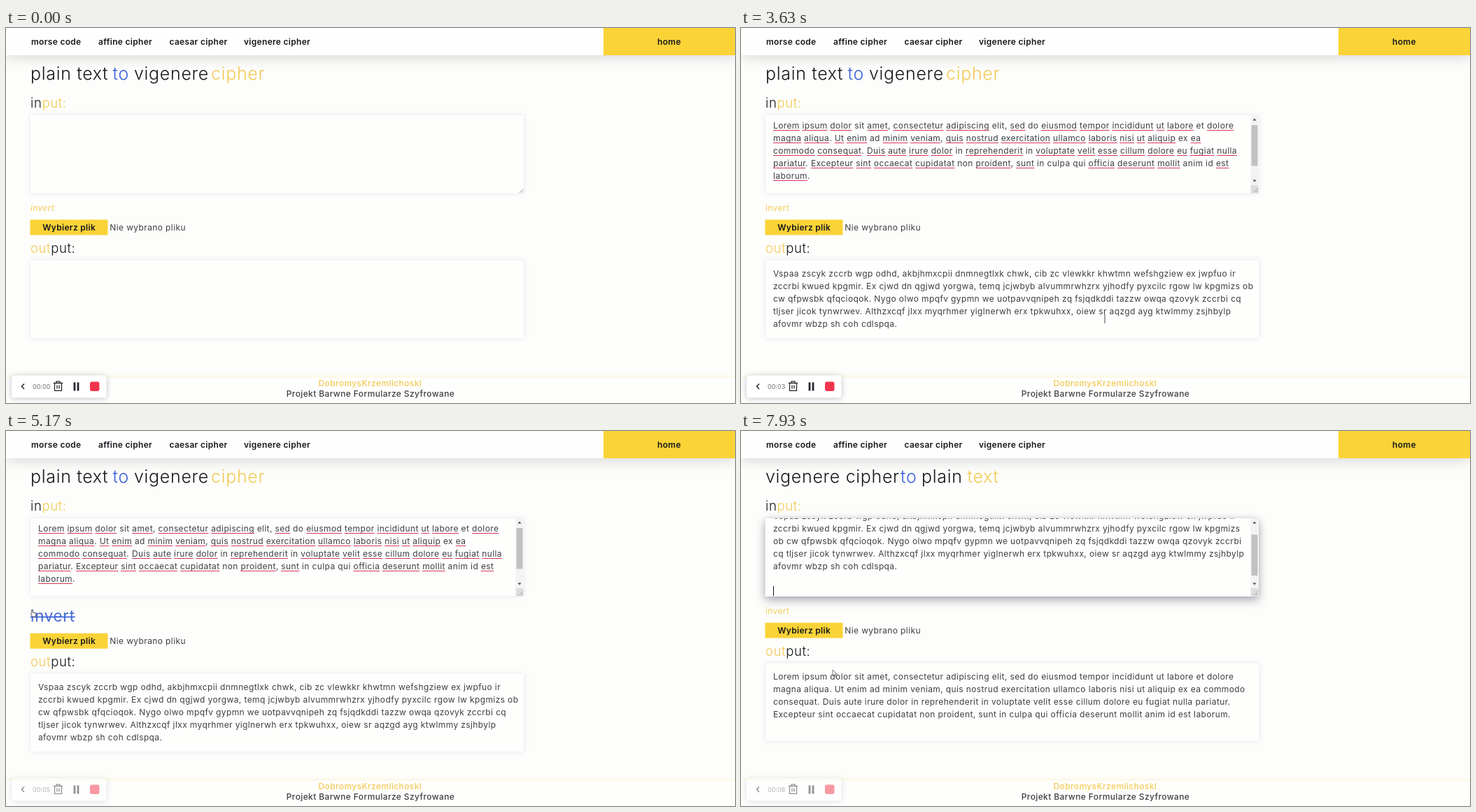
Recreate the animation shown at these times as an HTML page. Size 1042 by 537 pixels, loop 8 s.

```html
<!DOCTYPE html>
<html lang="pl">
<head>
<meta charset="utf-8">
<title>Cipher page</title>
<style>
html, body { margin: 0; width: 100%; height: 100%; overflow: hidden; background: #fdfdfb; }
svg { display: block; width: 1042px; height: 537px; }
text {
  font: 400 12px Inter, "Open Sans", sans-serif;
  font-optical-sizing: none;
  letter-spacing: .032em;
  fill: #3c3f44;
  white-space: pre;
}
.nav, .btn { font-weight: 600; letter-spacing: .025em; fill: #16181c; }
.title text { font-size: 25px; font-weight: 300; letter-spacing: .027em; fill: #16181c; }
.label { font-size: 18.5px; font-weight: 300; letter-spacing: .033em; fill: #16181c; }
.foot { font-weight: 500; text-anchor: middle; }
.mid { text-anchor: middle; }
.title .y, .label .y, .y { fill: #f3ca55; }
.title .b { fill: #3a62dc; }
.box { fill: #fefefd; filter: drop-shadow(0 0 3px rgba(60, 60, 130, .13)); }
#clock { font-size: 9px; letter-spacing: 0; fill: #6d7075; }
</style>
</head>
<body>
<svg viewBox="0 0 1042 537">
  <defs>
    <clipPath id="inClip"><rect x="35" y="125" width="693" height="111"/></clipPath>
  </defs>
  <rect width="1042" height="537" fill="#fdfdfb"/>

  <rect width="1042" height="39" fill="#fefefe" style="filter:drop-shadow(0 5px 9px rgba(0,0,0,.13))"/>
  <rect x="854" width="188" height="39" fill="#fad337"/>
  <text class="nav" x="36" y="23.5">morse code</text>
  <text class="nav" x="132" y="23.5">affine cipher</text>
  <text class="nav" x="233.5" y="23.5">caesar cipher</text>
  <text class="nav" x="340" y="23.5">vigenere cipher</text>
  <text class="nav mid" x="948" y="23.5">home</text>

  <g id="encode" class="title">
    <text x="35" y="74">plain text</text><text class="b" x="152.5" y="74">to</text>
    <text x="183" y="74">vigenere</text><text class="y" x="293" y="74">cipher</text>
  </g>
  <g id="decode" class="title">
    <text x="35" y="74">vigenere cipher</text><text class="b" x="228" y="74">to</text>
    <text x="258" y="74">plain</text><text class="y" x="323.5" y="74">text</text>
  </g>

  <text class="label" x="35" y="114">in<tspan class="y">put:</tspan></text>
  <rect id="glow" x="34.5" y="125" width="705" height="112" fill="#fff"
    style="filter:drop-shadow(0 5px 7px rgba(25,25,60,.36))"/>
  <rect class="box" x="35" y="125" width="705" height="111.5"/>
  <g clip-path="url(#inClip)">
    <g id="plainIn"></g>
    <g id="codedIn"></g>
    <text id="hint" x="46" y="149.3" style="fill:#777a7e">Type your message here</text>
    <path id="caret" d="M46.5 222v14.5" stroke="#111"/>
  </g>
  <path id="grip" d="M734 236l5.5-5.5M737 236l2.5-2.5" stroke="#888" stroke-width=".8"/>
  <g id="bar">
    <rect x="728.5" y="125" width="11" height="100" fill="#f3f3f3"/>
    <rect id="thumb" x="729.5" width="9" height="58.5" fill="#c1c1c1"/>
    <path d="M731.5 132.5h5l-2.5-3zM731.5 217.5h5l-2.5 3z" fill="#4b4b4b"/>
    <rect x="728.5" y="225" width="11" height="11.5" fill="#dedede"/>
    <path d="M733 235.5l6-6M736.5 235.5l2.5-2.5" stroke="#888" stroke-width=".8"/>
  </g>

  <text id="invert" x="35">invert</text>
  <rect id="strike" x="35" height="1.7" fill="#3a62dc"/>

  <g id="lower">
    <rect x="34.5" y="274.5" width="111" height="22" fill="#fad337"/>
    <text class="btn mid" x="90.2" y="290">Wybierz plik</text>
    <text x="148.3" y="290">Nie wybrano pliku</text>
    <text class="label" x="35" y="321.5"><tspan class="y">out</tspan>put:</text>
    <rect class="box" x="35" y="332.5" width="705" height="111.5"/>
    <g id="codedOut"></g>
    <g id="plainOut"></g>
  </g>
  <path id="edge" d="M35.3 275v29" stroke="#222" stroke-width="1.3"/>

  <rect y="501" width="1042" height="36" fill="#fefefd" style="filter:drop-shadow(0 -1px 3px rgba(250,215,70,.22))"/>
  <text class="foot y" x="520.5" y="513.3">DobromysKrzemlichoskI</text>
  <text class="foot" x="521" y="528.2">Projekt Barwne Formularze Szyfrowane</text>

  <g id="tools" fill="none" stroke="#25282d" stroke-width="1.5">
    <rect x="8" y="497.5" width="135.5" height="32" rx="4" fill="#fff" stroke="none" style="filter:drop-shadow(0 1px 4px rgba(40,50,90,.3))"/>
    <path d="M26 509.5l-3.5 3.7 3.5 3.7"/>
    <path d="M68 508.5h13M72 508v-1.8h5v1.8M69.5 509v10.3h10v-10.3M73 511.5v5M76 511.5v5" stroke-width="1.3"/>
    <path d="M98 507.5v12M103 507.5v12" stroke-width="2.8"/>
    <rect x="120" y="506.5" width="13.5" height="13.5" rx="3" fill="#f2354c" stroke="none"/>
    <text id="clock" x="38" y="516.6" stroke="none"></text>
  </g>

  <path id="ghost" d="M96 379v8l2-1.7 1.4 2.8 1.2-.6-1.3-2.7h2.7z" fill="#fff" stroke="#777" stroke-width=".7" opacity=".5"/>
  <g id="cursor">
    <path id="arrow" d="M0 0v8.5l2-1.8 1.4 2.8 1.3-.6-1.4-2.7h2.8z" fill="#fff" stroke="#555" stroke-width=".8"/>
    <path id="beam" d="M0 0v13" stroke="#444"/>
    <path id="hand" d="M-1 5L-1.5 .5q.7-1.2 1.5 0l.8 3.5 3.2 .6q1 .3 .9 1.5l-.5 3.9h-4.5l-2.7-3.5q-.2-1 .8-.8z" fill="#fff" stroke="#444" stroke-width=".9"/>
  </g>
</svg>

<script>
const LOOP = 8000, PASTE = 1070, SPELL = 2330, OVER = 4885, SWAP = 5450, OUT = 5680, PASTE2 = 7330;
const $ = id => document.getElementById(id);
const NS = "http://www.w3.org/2000/svg";
const put = (parent, tag, attrs) => {
  const e = parent.appendChild(document.createElementNS(NS, tag));
  for (const k in attrs) e.setAttribute(k, attrs[k]);
  return e;
};

const plain = "Lorem ipsum dolor sit amet, consectetur adipiscing elit, sed do eiusmod tempor incididunt ut labore et dolore " +
  "magna aliqua. Ut enim ad minim veniam, quis nostrud exercitation ullamco laboris nisi ut aliquip ex ea " +
  "commodo consequat. Duis aute irure dolor in reprehenderit in voluptate velit esse cillum dolore eu fugiat nulla " +
  "pariatur. Excepteur sint occaecat cupidatat non proident, sunt in culpa qui officia deserunt mollit anim id est laborum.";

// Punctuation uses up a key letter, spaces do not.
function vigenere(text, key) {
  let n = 0;
  return text.replace(/\S/g, c => {
    const shift = key.charCodeAt(n++ % key.length) - 97;
    if (!/[a-z]/i.test(c)) return c;
    const base = c < "a" ? 65 : 97;
    return String.fromCharCode((c.charCodeAt(0) - base + shift) % 26 + base);
  });
}
const coded = vigenere(plain, "keyword");

// Sets a paragraph with the given number of words on each line.
function paragraph(id, text, counts, y) {
  const words = text.split(" ");
  return counts.map((n, i) => {
    const line = put($(id), "text", { x: 46, y: y + i * 18 });
    line.textContent = words.splice(0, n).join(" ");
    return line;
  });
}
const typed = paragraph("plainIn", plain, [17, 17, 17, 17, 1], 144.2);
paragraph("codedIn", coded, [16, 16, 16, 16, 5], 126.2);
paragraph("codedOut", coded, [16, 17, 16, 15, 5], 356.2);
paragraph("plainOut", plain, [17, 18, 17, 17], 356.2);

// Spell-check marks under every word the checker does not know.
const known = new Set("sit elit do et ad ex in non culpa qui anim id".split(" "));
const marks = put($("plainIn"), "g", { fill: "#d8365a" });
for (const line of typed) {
  for (const m of line.textContent.matchAll(/[a-z]+/gi)) {
    if (known.has(m[0])) continue;
    const x = line.getStartPositionOfChar(m.index).x;
    const end = line.getEndPositionOfChar(m.index + m[0].length - 1).x;
    put(marks, "rect", { x, y: +line.getAttribute("y") + 1.8, width: end - x, height: 1 });
  }
}

const clamp = v => Math.max(0, Math.min(1, v));
const ramp = (t, a, b) => clamp((t - a) / (b - a));
const bez = (u, p, q) => 3 * u * (1 - u) * (1 - u) * p + 3 * u * u * (1 - u) * q + u * u * u;
function ease(x) {
  let lo = 0, hi = 1;
  for (let i = 0; i < 20; i++) {
    const u = (lo + hi) / 2;
    if (bez(u, .25, .25) < x) lo = u; else hi = u;
  }
  return bez(lo, .1, 1);
}

// Pointer stops: time, x, y.
const stops = [
  [300, 250, 66], [900, 390, 172], [1400, 390, 172], [1800, 204, 251], [2200, 160, 300],
  [2330, 160, 300], [2670, 91, 363], [3070, 228, 410], [3170, 520, 410], [3630, 520, 410],
  [4070, 279, 274], [4370, 279, 274], [5000, 38, 256], [6030, 38, 256],
  [6800, 390, 172], [7500, 390, 172], [7930, 131, 342], [8000, 131, 342]
];
function pointer(t) {
  let i = 1;
  while (i < stops.length - 1 && stops[i][0] < t) i++;
  const [a, b] = [stops[i - 1], stops[i]];
  const k = ramp(t, a[0], b[0]), s = k * k * (3 - 2 * k);
  return [a[1] + (b[1] - a[1]) * s, a[2] + (b[2] - a[2]) * s];
}

const show = (e, on) => e.style.visibility = on ? "visible" : "hidden";
const mix = (a, b, k) => "rgb(" + a.map((v, i) => Math.round(v + (b[i] - v) * k)) + ")";

function draw(t) {
  const second = t >= SWAP;
  const first = t >= PASTE && !second;
  const pasted = t >= PASTE2;

  show($("encode"), !second);
  show($("decode"), second);
  show($("plainIn"), first);
  show(marks, first && t >= SPELL);
  show($("codedOut"), first);
  show($("codedIn"), pasted);
  show($("plainOut"), pasted);
  show($("caret"), pasted);
  show($("hint"), second && !pasted);
  show($("bar"), first || pasted);
  show($("grip"), !first && !pasted);
  $("thumb").setAttribute("y", pasted ? 148.5 : 139);

  $("glow").style.opacity = ease(ramp(t, 600, 900)) * (1 - ramp(t, 2530, 2810)) + ease(ramp(t, 6800, 7100));

  const h = ease(ramp(t, OVER, OVER + 500)) * (1 - ease(ramp(t, OUT, OUT + 500)));
  const size = 12 * (1 + h), base = 262 + 12.6 * h;
  const link = $("invert");
  link.setAttribute("y", base);
  link.style.fontSize = size + "px";
  link.style.fontStyle = t < 300 ? "italic" : "normal";
  link.style.fill = mix([243, 202, 85], [48, 94, 228], h);
  const strike = $("strike");
  show(strike, t >= OVER && t < OUT);
  strike.setAttribute("y", base - size * .33);
  strike.setAttribute("width", link.getComputedTextLength());
  $("lower").setAttribute("transform", `translate(0 ${17.5 * h})`);
  show($("edge"), t >= 3900 && t < 4370);

  $("tools").style.opacity = 1 - .5 * ramp(t, 3630, 3900);
  $("clock").textContent = "00:0" + Math.floor((t + 250) / 1000);

  const [x, y] = pointer(t);
  const seen = t >= 300 && (t < OUT || t >= 6030);
  const hand = t >= OVER && t < OUT;
  const beam = !hand && x > 35 && x < 728 && (y > 118 && y < 230 || y > 346 && y < 440);
  $("cursor").setAttribute("transform", `translate(${x} ${y})`);
  show($("arrow"), seen && !hand && !beam);
  show($("beam"), seen && beam);
  show($("hand"), seen && hand);
  show($("ghost"), t >= 2600 && t < 2720);
}

function tick() {
  draw(performance.now() % LOOP);
  requestAnimationFrame(tick);
}
tick();
</script>
</body>
</html>
```
